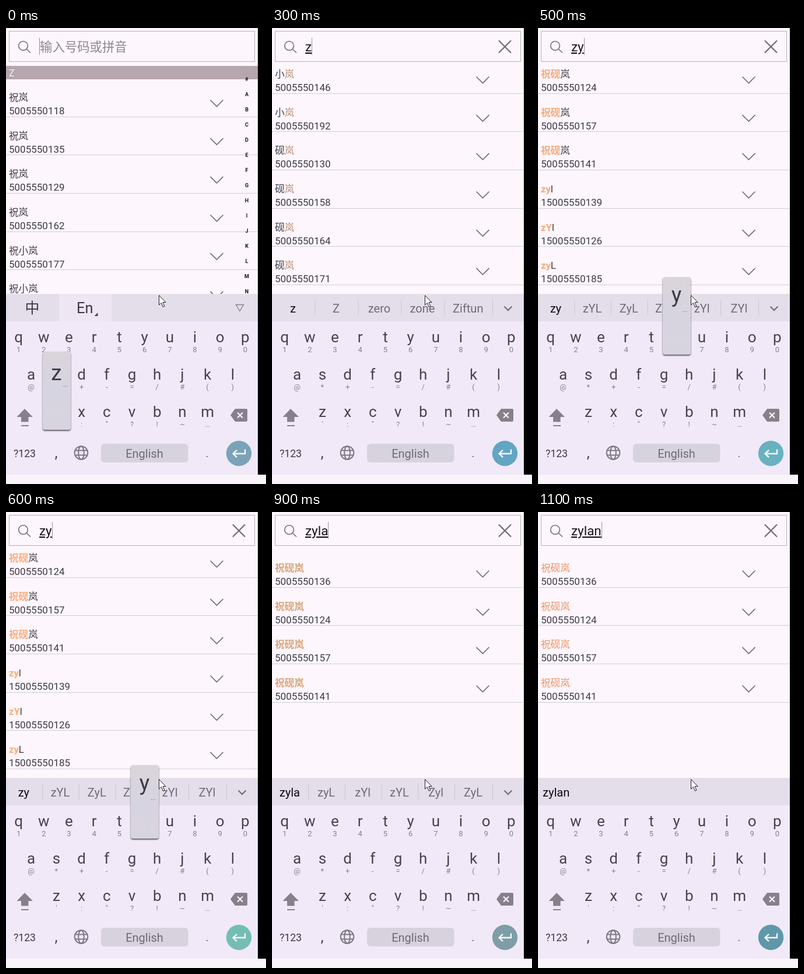
Animation, 446 px wide and 782 px high, one loop 1200 ms. Source, as an HTML page:

```html
<!DOCTYPE html>
<html lang="zh-CN">
<head>
<meta charset="utf-8">
<title>Contact search</title>
<style>
  html, body { margin: 0; width: 100%; height: 100%; overflow: hidden; background: #fdf6fd; }
  svg { display: block; width: 446px; height: 782px; }
  text { font-family: Roboto, "Noto Sans CJK SC", "Noto Sans CJK", sans-serif; fill: #3d3945; white-space: pre; }
  .mid { text-anchor: middle; }
  .line { fill: none; stroke: #6f6a76; stroke-width: 1.6; }
  .key { font-size: 26px; fill: #47424f; }
  .hint { font-size: 13px; fill: #85808c; }
  .item { font-size: 16.6px; }
  .tel { font-size: 17px; }
  .word { font-size: 20px; fill: #706b77; }
  .first { fill: #0c0a0f; }
  .query { font-size: 22.4px; fill: #17141b; text-decoration: underline; }
  .index { font-size: 9px; font-weight: 700; fill: #151219; }
  .hit { fill: var(--hit); }
  .bold { font-weight: 700; }
  #enter { fill: var(--enter); }
</style>
</head>
<body>
<svg id="stage" viewBox="0 0 446 782">
  <defs>
    <linearGradient id="popFill" x2="0" y2="1">
      <stop offset="0" stop-color="#dad4db"/>
      <stop offset=".5" stop-color="#d7d4e1"/>
      <stop offset="1" stop-color="#d8d4df"/>
    </linearGradient>
    <filter id="shade" x="-20%" y="-10%" width="140%" height="120%">
      <feDropShadow dx="0" dy="1.8" stdDeviation="1" flood-color="#3a3540" flood-opacity=".85"/>
    </filter>
  </defs>
  <rect width="446" height="782" fill="#fdf6fd"/>

  <g id="list"></g>

  <rect x="5.5" y="5.5" width="421" height="52" fill="#fdf7fd" stroke="#b9b1bb"/>
  <circle class="line" cx="29.5" cy="30.5" r="7.8"/>
  <path class="line" d="M35 36l7 6.5"/>
  <g id="field"></g>

  <rect y="456" width="432" height="310" fill="#f1e9f7"/>
  <rect y="766" width="446" height="16" fill="#f8f4f9"/>
  <rect y="456" width="432" height="47" fill="#e3deea"/>
  <g id="strip"></g>

  <path d="M32 653L18.500 667H26V675.500H38.500V667H46Z" fill="#86808b"/>
  <rect x="26" y="681" width="13" height="2" fill="#86808b"/>
  <path d="M385 664L393 653H412Q414 653 414 655V673Q414 675 412 675H393Z" fill="#86808b"/>
  <path d="M397 659.500l9 9m0-9l-9 9" stroke="#fbf4fc" stroke-width="2.2"/>

  <g fill="none" stroke="#7d7884" stroke-width="2">
    <circle cx="129" cy="728.500" r="11.300"/>
    <ellipse cx="129" cy="728.500" rx="4.800" ry="11.300"/>
    <path d="M118.500 724.500h21m-21 8h21"/>
  </g>
  <rect x="163" y="713" width="149.500" height="32" rx="6" fill="#d6d2de"/>
  <circle id="enter" cx="399.500" cy="729.500" r="21.700"/>
  <path d="M410 722.500V730H390m6-6.200L389.500 730l6.500 6.200" fill="none" stroke="#fbf8fc" stroke-width="2.300"/>
  <g id="keys"></g>

  <rect x="432" width="14" height="766"/>
  <g id="popup"></g>
  <path d="M262.500 458.500v16.500l3.900-3.600 2.900 7 2.600-1.200-2.900-6.700h5z" fill="#fff" stroke="#1c1920"/>
</svg>
<script>
const STEP = 100, STEPS = 12, PITCH = 65.67;
const $ = id => document.getElementById(id);
const text = (x, y, s, cls, extra = "") => `<text x="${x}" y="${y}" class="${cls}" ${extra}>${s}</text>`;
const rule = (x1, y1, x2, y2, color) => `<path d="M${x1} ${y1}L${x2} ${y2}" stroke="${color}"/>`;
const tel = n => "50055501" + n;
const long = n => "1" + tel(n);

// In names, the part between brackets is highlighted.
const lists = {
  all: { top: 119, rows: [["祝岚", tel(18)], ["祝岚", tel(35)], ["祝岚", tel(29)], ["祝岚", tel(62)], ["祝小岚", tel(77)], ["祝小岚", tel(83)]] },
  one: { top: 79, rows: [["小[岚]", tel(46)], ["小[岚]", tel(92)], ["砚[岚]", tel(30)], ["砚[岚]", tel(58)], ["砚[岚]", tel(64)], ["砚[岚]", tel(71)]] },
  two: { top: 79, bold: true, rows: [["[祝砚]岚", tel(24)], ["[祝砚]岚", tel(57)], ["[祝砚]岚", tel(41)], ["[zy]l", long(39)], ["[zY]l", long(26)], ["[zy]L", long(85)]] },
  full: { top: 96, rows: [36, 24, 57, 41].map(n => ["[祝砚岚]", tel(n)]) }
};
lists.three = { top: 79, rows: lists.two.rows.map(([name, n]) => [`[${name.replace(/[[\]]/g, "")}]`, n]) };
lists.four = { ...lists.full, bold: true };

const tail = ["zyL", "zYl", "zYL", "Zyl", "ZyL"];
const words = {
  z: ["z", "Z", "zero", "zone", "Ziftun"],
  zy: ["zy", "zYL", "ZyL", "ZYL", "zYl", "ZYl"],
  zyl: ["zyl", ...tail],
  zyla: ["zyla", ...tail],
  zylan: ["zylan"]
};

// drop: from the popup's top edge to the baseline of its letter
const popZ = { key: "z", x: 63, top: 555, bottom: 689, drop: 49 };
const popY = { key: "y", x: 214, top: 427, bottom: 560, drop: 43 };
const popYLow = { ...popY, top: 434 };

// at: first step of each state
const states = [
  { at: 0, query: "", list: "all", pop: popZ, hit: "#c08a5a", enter: "#7ba3b8" },
  { at: 1, query: "z", list: "one", words: "z", pop: popZ, hit: "#bd8858", enter: "#69a6b9" },
  { at: 3, query: "z", list: "one", words: "z", hit: "#bb8c6a", enter: "#62a6c4" },
  { at: 4, query: "z", list: "one", words: "zy", pop: popY, hit: "#b89080", enter: "#5ba6cf" },
  { at: 5, query: "zy", list: "two", words: "zy", pop: popY, hit: "#f5aa7a", enter: "#68b2c0" },
  { at: 6, query: "zy", list: "two", words: "zy", pop: popYLow, hit: "#ffab78", enter: "#74bdb5" },
  { at: 7, query: "zyl", list: "three", words: "zyl", hit: "#c8804f", enter: "#63afac" },
  { at: 9, query: "zyla", list: "four", words: "zyla", hit: "#d9a57c", enter: "#7e9da6" },
  { at: 11, query: "zylan", list: "full", words: "zylan", hit: "#ee8f62", enter: "#5f98ab" }
];

function drawKeys() {
  const rows = [
    ["qwertyuiop", "1234567890", 21.6, 539],
    ["asdfghjkl", "@*+-=/#()", 43.2, 603],
    ["zxcvbnm", "':\"?!~…", 86.4, 667]
  ];
  let out = "";
  for (const [keys, hints, x0, y] of rows)
    [...keys].forEach((k, i) => {
      const x = x0 + i * 43.2;
      out += text(x, y, k, "key mid") + text(x, y + 17, hints[i], "hint mid");
    });
  out += text(32, 736, "?123", "mid", 'font-size="17.600"');
  out += text(86, 737, ",", "key mid") + text(345, 736, ".", "word mid");
  out += text(237.5, 736.5, "English", "word mid");
  $("keys").innerHTML = out;
}

function drawList(id) {
  const { top, rows, bold } = lists[id];
  const hit = `<tspan class="hit${bold ? " bold" : ""}">`;
  let out = "";
  if (id === "all")
    out += '<rect y="65" width="432" height="23" fill="#b5a7ad"/>' +
      text(5, 83, "Z", "", 'style="font-size:16px;fill:#f8f0f8"');
  rows.forEach(([name, number], i) => {
    const y = top + i * PITCH, edge = Math.floor(y + 33) + .5;
    out += text(5, y + 6, name.replace("[", hit).replace("]", "</tspan>"), "item");
    out += text(5, y + 29, number, "tel");
    out += `<path class="line" d="M350.500 ${y + 4.5}l11 11 11-11"/>`;
    out += rule(0, edge, 432, edge, "#d0cedb");
  });
  if (id === "all")
    [..."#ABCDEFGHIJKLMN"].forEach((c, i) => out += text(413, 91 + i * 26, c, "index mid"));
  $("list").innerHTML = out;
}

function drawField(query) {
  const field = $("field");
  if (!query) {
    field.innerHTML = text(58, 40, "输入号码或拼音", "", 'style="font-size:21.4px;fill:#8d8590"') +
      rule(57.5, 17, 57.5, 46, "#8d8590");
    return;
  }
  field.innerHTML = text(57, 40, query, "query") +
    '<path d="M389 21.500l21 21m0-21l-21 21" stroke="#716b77" stroke-width="2.300"/>';
  const x = Math.round(57 + field.firstChild.getComputedTextLength()) + .5;
  field.innerHTML += rule(x, 17, x, 46, "#98919b");
}

function drawStrip(id) {
  const list = words[id];
  let out = "";
  if (!list) {
    out = '<rect x="91" y="456" width="90" height="47" fill="#eee7f3"/>' +
      text(45, 489, "中", "mid", 'font-size="25" font-weight="300"') +
      text(121, 489, "En", "", 'font-size="25.500"') +
      '<path d="M157.500 488v6h-6z" fill="#47424f"/>' +
      '<path d="M394.500 474.500h13L401 485.500z" fill="none" stroke="#85808c" stroke-width="1.300"/>';
  } else if (list.length === 1) {
    out = text(8, 488, list[0], "word first");
  } else {
    const gap = list.length === 5 ? 74 : 62.7;
    list.forEach((w, i) => {
      const left = i * gap, right = i === list.length - 1 ? 378.5 : left + gap;
      const mid = (left + right) / 2 - 1;
      out += text(mid, 488, w, "word mid" + (i ? "" : " first")) + rule(right, 466, right, 493, "#cbc5d1");
    });
    out += '<path d="M398.500 477.500l6.500 6.500 6.500-6.500" fill="none" stroke="#77727e" stroke-width="2.300"/>';
  }
  $("strip").innerHTML = out;
}

function drawPopup(p) {
  $("popup").innerHTML = !p ? "" :
    `<rect x="${p.x}" y="${p.top}" width="48" height="${p.bottom - p.top}" rx="4" fill="url(#popFill)" filter="url(#shade)"/>` +
    text(p.x + 23.5, p.top + p.drop, p.key, "mid", 'font-size="37"') +
    text(p.x + 38, p.top + 60, "…", "hint mid");
}

function draw(state) {
  $("stage").style.setProperty("--hit", state.hit);
  $("stage").style.setProperty("--enter", state.enter);
  drawList(state.list);
  drawField(state.query);
  drawStrip(state.words);
  drawPopup(state.pop);
}

const start = performance.now();
let shown;
function tick() {
  const step = Math.floor((performance.now() - start) / STEP) % STEPS;
  const state = states.filter(s => s.at <= step).pop();
  if (state !== shown) draw(shown = state);
  requestAnimationFrame(tick);
}
drawKeys();
tick();
</script>
</body>
</html>
```
